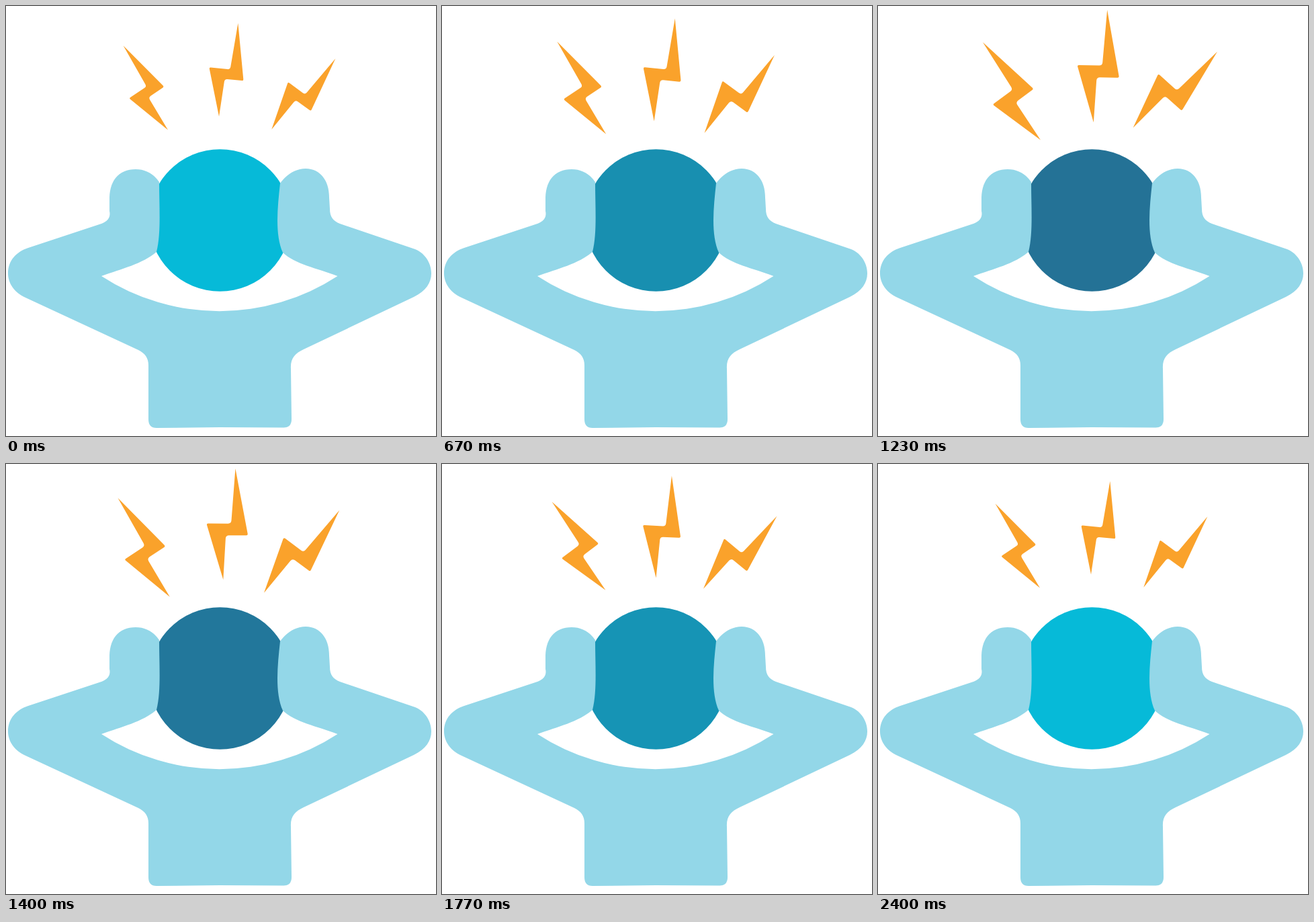
Recreate the animation shown at these times as an HTML page. Size 640 by 640 pixels, loop 2430 ms.

```html
<!DOCTYPE html>
<html lang="en">
<head>
<meta charset="utf-8">
<title>Headache</title>
<style>
  html, body { margin: 0; width: 100%; height: 100%; overflow: hidden; background: #fff; }
  svg { display: block; width: 100%; height: 100%; }
</style>
</head>
<body>
<svg viewBox="0 0 640 640">
  <defs>
    <!-- 100 units long, centred, tip up -->
    <path id="bolt" d="M0 -50 L17.2 6.5 Q17.7 8.1 16.1 8.3 L0.8 9.9 Q-2 10.2 -1.9 13
      L0 50 L-19.8 3 Q-20.4 1.5 -18.8 1.35 L-1.2 -0.4 Q1.6 -0.7 1.5 -3.5 Z"/>
  </defs>
  <circle id="head" cx="318.5" cy="319" r="105.7"/>
  <path fill="#93d7e8" d="M212 615 V535 C212 524 207 517 197 512 L29 434
    C13 427 3 413 3 398 C3 379 15 366 33 360 L142 324 C152 320 156 314 154 305 V285
    C155 256 171 243 193 243 C208 243 220 250 228 262 C228 300 231 338 224 366
    C203 384 172 391 142 402 A322 322 0 0 0 493.5 402 C462 390 430 384 412 367
    C400 340 404 300 408 264 C417 251 431 242 446 242 C466 242 481 258 481 285
    L482 302 C482 314 487 320 497 324 L606 361 C622 366 633 381 633 398
    C633 412 625 424 607 433 L443 511 C430 517 423 525 424 540 L425 615
    Q425 627.5 413 627.5 L318 627 L224 628 Q212 628 212 615 Z"/>
  <g fill="#faa22b">
    <use href="#bolt"/>
    <use href="#bolt"/>
    <use href="#bolt"/>
  </g>
</svg>
<script>
const LOOP = 2430, END = 2400, PEAK = 1190;
const CALM = [6, 186, 216], TENSE = [36, 114, 150];
const SHORT = 142, LONG = 169;

// resting place [x, y, degrees] and how far each jolt moves the bolt from it
const BOLTS = [
  { rest: [207.8, 121.8, -27.9], open: [-6.8, 0.3, -5.3], lift: [-8.8, 5, -2.7], close: [3.3, -0.3, 3.1] },
  { rest: [331.2, 95, 11.5], open: [-1.5, -2.5, -4.4], lift: [-0.2, -5.5, -4.6], close: [2.5, -5.3, -5.9] },
  { rest: [442.8, 131, 42], open: [1.5, 1, 5.3], lift: [-0.5, -6.3, 5.9], close: [-4.8, 4.8, -5] }
];
const JOLTS = [
  { at: 670, move: 'open', force: 0 },
  { at: 1030, move: 'open', force: 1 },
  { at: 1230, move: 'lift', force: 1 },
  { at: 1570, move: 'close', force: 1 },
  { at: 1720, move: 'open', force: 0.7 },
  { at: 1970, move: 'open', force: 0 }
];

const head = document.getElementById('head');
const bolts = document.querySelectorAll('use');

const lerp = (a, b, u) => a + (b - a) * u;
const ease = u => (1 - Math.cos(Math.PI * u)) / 2;

function place(bolt, t) {
  const next = JOLTS.findIndex(j => j.at > t);
  if (next < 1) return bolt.rest;
  const a = JOLTS[next - 1], b = JOLTS[next];
  const u = ease((t - a.at) / (b.at - a.at));
  return bolt.rest.map((v, i) =>
    v + lerp(bolt[a.move][i] * a.force, bolt[b.move][i] * b.force, u));
}

function draw(time) {
  const t = Math.min(time % LOOP, END);
  const pain = ease(t < PEAK ? t / PEAK : (END - t) / (END - PEAK));
  const rgb = CALM.map((c, i) => Math.round(lerp(c, TENSE[i], pain)));
  head.setAttribute('fill', `rgb(${rgb})`);

  const size = lerp(SHORT, LONG, pain ** 1.3) / 100;
  BOLTS.forEach((bolt, i) => {
    const [x, y, turn] = place(bolt, t);
    bolts[i].setAttribute('transform', `translate(${x} ${y}) rotate(${turn}) scale(${size})`);
  });
}

const start = performance.now();
function tick() {
  draw(performance.now() - start);
  requestAnimationFrame(tick);
}
tick();
</script>
</body>
</html>
```
